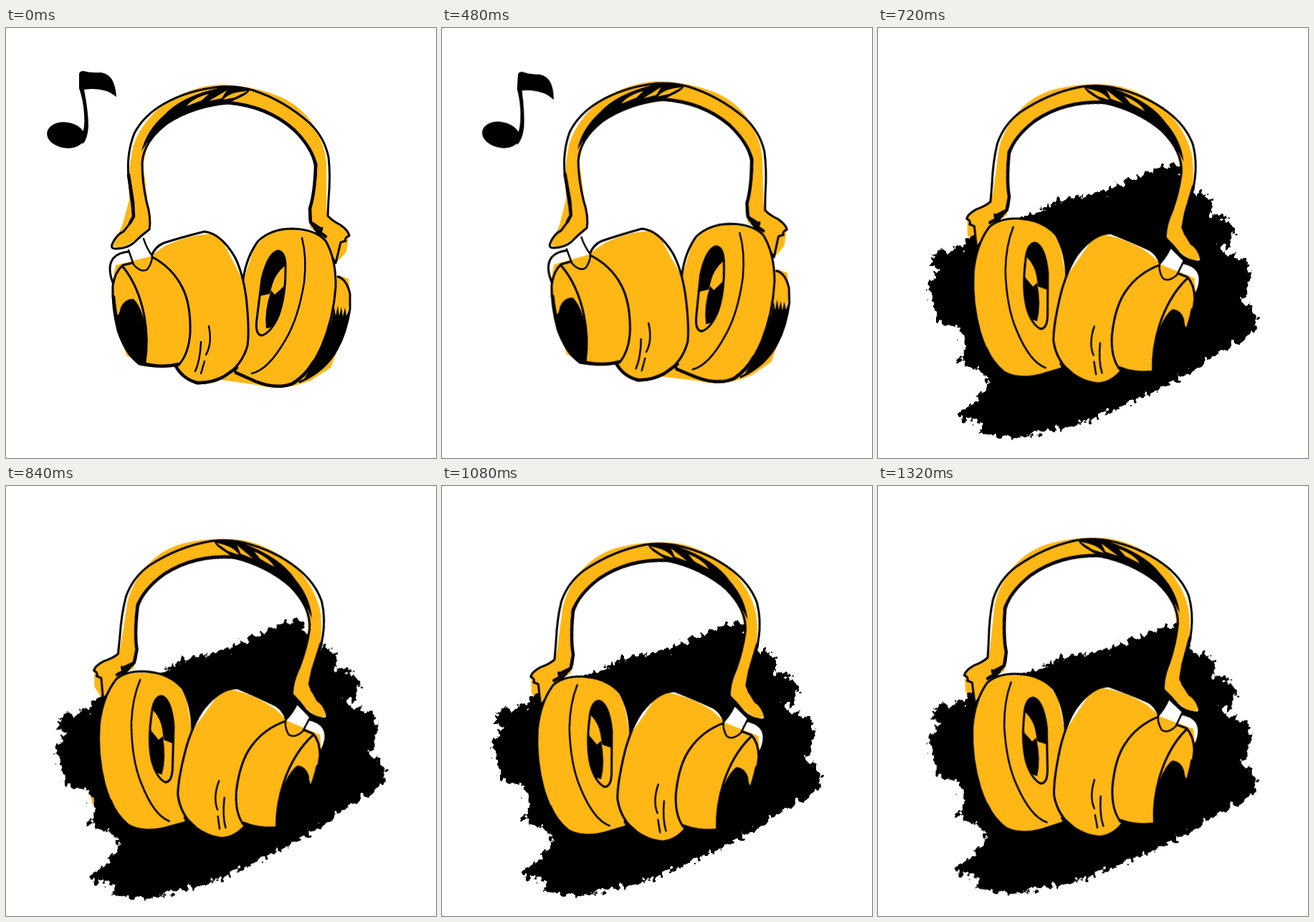
These frames come from a looping animation (600 px wide and 600 px high, 1.44 s). An HTML page without scripts:

```html
<!DOCTYPE html>
<html lang="en">
<head>
<meta charset="utf-8">
<title>Headphones</title>
<style>
html, body { margin: 0; width: 100%; height: 100%; overflow: hidden; background: #fff; }
svg { display: block; width: 100%; height: 100%; }

.first { animation: first 1440ms step-end infinite; }
.second { animation: second 1440ms step-end infinite; }
.pose { transform-origin: 300px 296px; animation: pose 360ms step-end infinite; }
.note { transform-origin: 90px 128px; animation: note 360ms step-end infinite; }
.paint { transform-origin: 300px 385px; animation: paint 360ms step-end infinite; }

@keyframes first { 0% { opacity: 1; } 50%, 100% { opacity: 0; } }
@keyframes second { 0% { opacity: 0; } 50%, 100% { opacity: 1; } }
@keyframes pose {
  0%, 100% { transform: none; }
  33.333% { transform: translate(2.5px, -4.5px) rotate(-1.3deg); }
  66.667% { transform: translate(3.5px, -6px) rotate(1.4deg); }
}
@keyframes note {
  0%, 100% { transform: none; }
  33.333% { transform: rotate(3.6deg); }
  66.667% { transform: rotate(-3deg); }
}
@keyframes paint {
  0%, 100% { transform: none; }
  33.333% { transform: rotate(-2deg); }
  66.667% { transform: rotate(1.6deg); }
}

.tint { fill: #ffb715; }
.paper { fill: #fff; }
.line { fill: none; stroke: #000; stroke-width: 3; stroke-linecap: round; stroke-linejoin: round; }
.bold { stroke-width: 4.5; }
.thin { stroke-width: 2.5; }
</style>
</head>
<body>
<svg viewBox="0 0 600 600">
<defs>
  <filter id="rough" filterUnits="userSpaceOnUse" x="30" y="150" width="540" height="450">
    <feGaussianBlur in="SourceAlpha" stdDeviation="6.5" result="soft"/>
    <feTurbulence type="fractalNoise" baseFrequency=".13 .12" numOctaves="3" seed="7" result="grain"/>
    <feComposite in="soft" in2="grain" operator="arithmetic" k2="1" k3="1.1" k4="-.55"/>
    <feColorMatrix values="0 0 0 0 0  0 0 0 0 0  0 0 0 0 0  0 0 0 20 -9.5"/>
  </filter>

  <!-- outlines -->
  <path id="band" d="M148 302Q154 288 164 284Q172 275 178 264Q175 240 171 208Q168 175 179 147Q192 122 220 106Q255 86 300 82Q325 81 345 87Q388 101 424 133Q444 152 450 180Q453 205 450 240L449 262Q455 269 467 275Q478 283 479 290Q472 292 474 297L467 299L460 328L450 310L429 277Q422 272 424 252Q432 225 433 190Q426 166 402 143Q365 110 310 105Q262 109 225 133Q192 158 190 188Q190 215 196 242Q203 265 200 281Q188 290 178 300Q168 308 153 308Q146 308 148 302Z"/>
  <path id="cup" d="M331 350Q336 318 352 297Q370 280 400 280Q432 281 446 297Q461 323 460 362Q457 405 440 445Q422 484 400 497Q378 505 350 494L320 481L325 400Z"/>
  <path id="ear" d="M203 318Q208 305 220 300Q245 292 277 284Q300 287 319 319Q330 340 335 375Q340 420 337 443Q329 472 303 487Q285 496 267 496Q247 490 236 470L250 400Z"/>
  <path id="pod" d="M163 331Q185 326 203 319Q232 334 246 362Q258 385 257 425Q255 455 241 470Q218 475 186 469Q166 453 156 422Q148 390 149 360Q152 340 163 331Z"/>
  <path id="lug" d="M150 358Q140 333 150 321Q157 313 172 312L178 330L163 332Z"/>
  <path id="strap" d="M171 310L178 330Q188 342 197 337Q204 328 204 318Q196 307 192 294Z"/>
  <clipPath id="inBand"><use href="#band"/></clipPath>
  <clipPath id="inCup"><use href="#cup"/></clipPath>
  <clipPath id="inEar"><use href="#ear"/><use href="#lug"/></clipPath>
  <clipPath id="inStrap"><use href="#strap"/></clipPath>

  <!-- offset colour -->
  <path id="bandTint" class="tint" d="M149 304L162 276L172 240Q169 200 178 163Q192 125 228 101Q265 80 300 79Q345 80 385 97Q414 111 429 136Q446 165 447 190L447 250L450 263L479 285L475 312L462 327L440 290L424 278L423 250Q434 215 432 190Q418 150 380 125Q340 105 305 105Q250 110 215 140Q192 165 192 195L201 270L196 287L160 308Z"/>
  <path id="bodyTint" class="tint" d="M148 355L153 331L200 319L222 304Q255 288 292 287L302 297L331 353L345 310Q360 286 385 279L445 288L459 330L460 352L464 345L478 350L481 375L470 430L453 474L425 492Q385 508 350 498L300 491L270 496L245 486L235 470L190 468L168 457L152 410L147 370Z"/>

  <g id="back">
    <use href="#bandTint"/>
    <use href="#bodyTint"/>
    <path class="line" d="M463 347Q475 350 480 371V392Q475 425 462 448Q446 478 410 494"/>
    <path d="M455 405L458 389L460 402L463 387L465 402L468 389L470 403L473 390L475 402L479 392Q476 425 462 449Q447 476 416 489Q442 450 455 405Z"/>
  </g>

  <g id="front">
    <use href="#band" class="paper"/>
    <g clip-path="url(#inBand)"><use href="#bandTint"/></g>
    <use href="#band" class="line"/>
    <path d="M189 172Q196 143 220 122Q244 95 300 83Q325 80 340 87Q337 93 322 99Q312 105 300 105Q262 110 225 134Q203 149 189 172Z"/>
    <path class="tint" d="M252 109Q260 98 283 92L273 101ZM283 102L308 87L301 98ZM303 100Q312 89 337 88L319 97Z"/>
    <path class="line bold" d="M171 205L177 243L178 263L173 272M310 104Q365 109 402 142Q428 168 432 192Q431 230 424 252L425 271L440 281"/>
    <path class="line" d="M441 279L438 288"/>

    <use href="#cup" class="paper"/>
    <g clip-path="url(#inCup)"><use href="#bodyTint"/></g>
    <use href="#cup" class="line"/>
    <path class="line bold" d="M321 481L348 493Q378 505 400 496Q418 485 429 466M431 280L446 291"/>
    <path class="line thin" d="M413 293Q420 320 416 355Q408 405 390 435Q366 477 343 482"/>
    <path id="eye" class="line" style="fill:#ffb715" d="M380 311Q391 313 390 337Q390 375 380 402Q370 425 357 429Q347 428 350 406L357 350Q366 313 380 311Z"/>
    <path d="M380 311Q390 313 389 332Q376 343 372 357L368 371L354 374Q356 340 368 319Q374 311 380 311ZM370 366L375 372L388 360Q388 390 378 407Q372 420 363 419Q360 395 370 366Z"/>

    <use href="#ear" class="paper"/>
    <use href="#lug" class="paper"/>
    <g clip-path="url(#inEar)"><use href="#bodyTint"/></g>
    <path class="line" d="M203 318Q208 305 220 300Q245 292 277 284Q300 287 319 319Q330 340 335 375Q340 420 337 443Q329 472 303 487Q285 496 267 496Q247 490 236 470M150 358Q140 333 150 321Q157 313 172 312"/>
    <path class="line bold" d="M237 472Q247 490 267 495Q285 496 303 487L322 474"/>
    <path class="line thin" d="M283 416Q288 440 279 456M272 438Q271 464 264 479M277 465L272 482"/>

    <use href="#pod" class="tint"/>
    <use href="#pod" class="line"/>
    <path class="line" d="M163 333Q185 360 193 402Q199 435 194 466"/>
    <path class="line bold" d="M150 375Q153 415 168 447Q177 464 190 468Q218 475 241 469"/>
    <path d="M151 400Q157 406 160 390Q166 377 178 378Q186 385 192 405Q200 436 194 468Q176 467 163 440Q153 421 151 400Z"/>
    <use href="#strap" class="paper"/>
    <g clip-path="url(#inStrap)"><use href="#bodyTint"/></g>
    <path class="line thin" d="M171 310L178 330Q188 342 197 337Q204 328 204 318Q196 307 192 294"/>
  </g>
</defs>

<g class="first">
  <g class="pose"><use href="#back"/><use href="#front"/></g>
  <g class="note">
    <ellipse cx="83.5" cy="149.5" rx="26.5" ry="18" transform="rotate(8 83.5 149.5)"/>
    <path d="M102 65Q102 60 108 60Q119 63 132 62Q152 64 154 96Q137 82 109 86Q115 117 115 137Q114 155 107 162L104 153Q111 142 109 120Q108 102 102 84Z"/>
  </g>
</g>

<g class="second">
  <g transform="translate(287.5 293.5) rotate(7.4) scale(-1 1) translate(-313 -296)">
    <g class="pose"><use href="#back"/></g>
  </g>
  <g class="paint">
    <path filter="url(#rough)" d="M420 186L375 203L300 232L255 238L222 258L180 273L130 288L118 306L70 316L85 345L65 360L80 385L79 411L116 418L122 445L108 466L142 476L156 493L140 517L98 552L146 546L143 568L184 572L240 562L290 549L330 532L380 511L430 484L460 464L500 439L528 422L526 391L503 383L520 360L518 326L490 315L465 311L498 297L493 265L465 265L466 233L440 231L425 213Z"/>
  </g>
  <g transform="translate(287.5 293.5) rotate(7.4) scale(-1 1) translate(-313 -296)">
    <g class="pose"><use href="#front"/></g>
  </g>
</g>
</svg>
</body>
</html>
```
